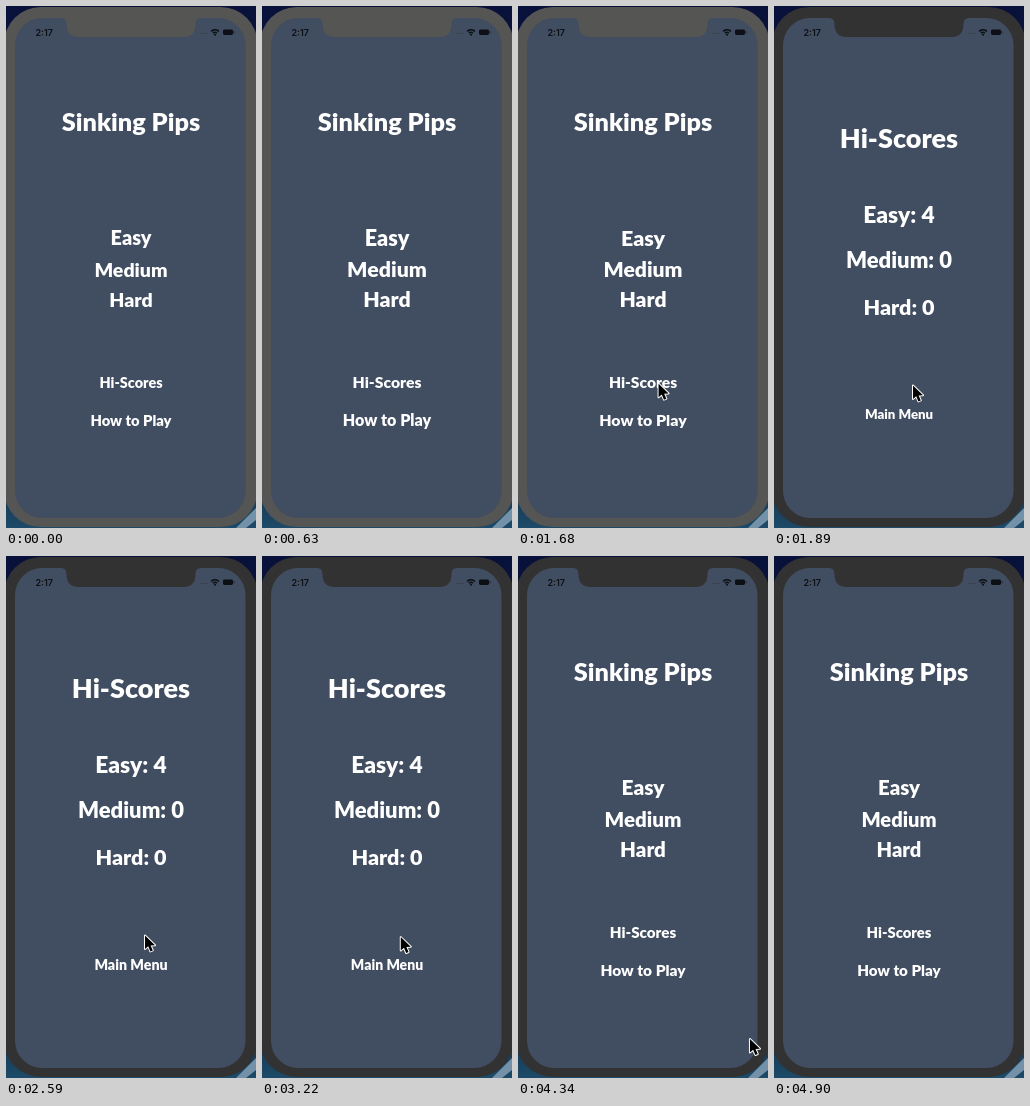
An HTML page with a canvas that plays this animation: 250 by 522 pixels, repeating every 4970 ms.

```html
<!DOCTYPE html>
<html lang="en">
<head>
<meta charset="utf-8">
<title>Sinking Pips</title>
<style>
html, body { margin: 0; width: 100%; height: 100%; overflow: hidden; background: #0a1433; }
canvas { display: block; }
</style>
</head>
<body>
<canvas id="stage" width="250" height="522"></canvas>
<script>
const ctx = document.getElementById('stage').getContext('2d');
const LOOP = 4970, STEP = 70;
const TO_SCORES = 1750, TO_MENU = 3990;
const CENTER = 125;
const INK = '#0c1016';

// Cursor moves: start, end, from x, y, to x, y
const MOVES = [
  [1050, 1260, 252, 408, 149, 368],
  [1470, 1750, 149, 368, 139, 379],
  [3150, 3640, 139, 379, 135, 408],
  [4060, 4440, 135, 408, 252, 498]
];

const ease = p => p * p * (3 - 2 * p);
const mix = (a, b, p) => a + (b - a) * p;

function roundBox(x, y, w, h, r, color) {
  ctx.fillStyle = color;
  ctx.beginPath();
  ctx.roundRect(x, y, w, h, r);
  ctx.fill();
}

function label(text, y, size, scale = 1) {
  ctx.save();
  ctx.translate(CENTER, y);
  ctx.scale(scale, scale);
  ctx.font = `900 ${size}px Lato, "Open Sans", sans-serif`;
  ctx.textAlign = 'center';
  ctx.fillStyle = '#fff';
  ctx.fillText(text, 0, size * 0.36);
  ctx.restore();
}

// Breathes between 1 and 1.1 once a second, smallest at time `low`
const pulse = (t, low) => 1.05 - 0.05 * Math.cos((t - low) * Math.PI / 500);

function drawDesktop() {
  const sky = ctx.createLinearGradient(0, 0, 0, 522);
  sky.addColorStop(0, '#08113a');
  sky.addColorStop(0.3, '#0b1737');
  sky.addColorStop(0.9, '#14304a');
  sky.addColorStop(1, '#1c4a68');
  ctx.fillStyle = sky;
  ctx.fillRect(0, 0, 250, 522);
  ctx.fillStyle = '#7391a8';
  ctx.beginPath();
  ctx.moveTo(250, 502);
  ctx.lineTo(250, 514);
  ctx.lineTo(240, 522);
  ctx.lineTo(230, 522);
  ctx.fill();
}

function drawStatus() {
  ctx.fillStyle = INK;
  ctx.font = '600 9px Inter, sans-serif';
  ctx.textAlign = 'left';
  ctx.fillText('2:17', 29.5, 29.5);

  ctx.strokeStyle = INK;
  ctx.lineWidth = 1.5;
  for (const r of [2.7, 5.2]) {
    ctx.beginPath();
    ctx.arc(209, 29, r, -Math.PI * 0.77, -Math.PI * 0.23);
    ctx.stroke();
  }
  ctx.beginPath();
  ctx.arc(209, 28.8, 1, 0, 7);
  ctx.fill();

  roundBox(217, 23.5, 10, 5.5, 1.4, INK);
  ctx.fillRect(227.6, 25.2, 0.8, 2);
  ctx.fillStyle = 'rgba(16,20,26,.3)';
  for (let i = 0; i < 4; i++) ctx.fillRect(194 + i * 2, 27, 1, 1);
}

function drawPhone(active) {
  const bezel = active ? '#323232' : '#555554';
  roundBox(-2, 1, 253.5, 520, 37, bezel);
  roundBox(9, 12, 230.5, 500, 27, '#414d60');
  ctx.fillStyle = bezel;
  ctx.beginPath();
  ctx.moveTo(55, 11);
  ctx.lineTo(55, 12);
  ctx.quadraticCurveTo(60.5, 12, 60.5, 18);
  ctx.quadraticCurveTo(60.5, 31, 73, 31);
  ctx.lineTo(177, 31);
  ctx.quadraticCurveTo(189.5, 31, 189.5, 18);
  ctx.quadraticCurveTo(189.5, 12, 195, 12);
  ctx.lineTo(195, 11);
  ctx.fill();
  drawStatus();
}

function drawMenu(t) {
  const s = pulse(t, t < TO_SCORES ? 40 : 4085);
  label('Sinking Pips', 115.5, 25.3);
  label('Easy', 232, 19.8, s);
  label('Medium', 263.5, 19.5, s);
  label('Hard', 293.5, 19.5, s);
  label('Hi-Scores', 376.5, 14.4, s);
  label('How to Play', 414.5, 14.7, s);
}

function drawScores(t) {
  label('Hi-Scores', 132.5, 27);
  label('Easy: 4', 208.5, 22.8);
  label('Medium: 0', 254, 22);
  label('Hard: 0', 301, 21.5);
  label('Main Menu', 408.5, 13.2, pulse(t, 1930));
}

function drawCursor(t) {
  const move = MOVES.filter(m => t >= m[0]).pop();
  if (!move) return;
  const [start, end, x0, y0, x1, y1] = move;
  const p = ease(Math.min(1, (t - start) / (end - start)));
  ctx.save();
  ctx.translate(mix(x0, x1, p), mix(y0, y1, p));
  ctx.beginPath();
  ctx.moveTo(0, 0.5);
  ctx.lineTo(0, 14);
  ctx.lineTo(3.2, 11.2);
  ctx.lineTo(5.4, 16.4);
  ctx.lineTo(7.8, 15.4);
  ctx.lineTo(5.6, 10.4);
  ctx.lineTo(10, 10.2);
  ctx.closePath();
  ctx.lineJoin = 'round';
  ctx.lineWidth = 2;
  ctx.strokeStyle = '#fff';
  ctx.fillStyle = '#000';
  ctx.stroke();
  ctx.fill();
  ctx.restore();
}

function draw(now) {
  const t = Math.floor((now % LOOP) / STEP) * STEP;
  drawDesktop();
  drawPhone(t >= TO_SCORES);
  if (t >= TO_SCORES && t < TO_MENU) drawScores(t);
  else drawMenu(t);
  drawCursor(t);
}

const began = performance.now();
function tick() {
  draw(performance.now() - began);
  requestAnimationFrame(tick);
}
tick();
</script>
</body>
</html>
```
